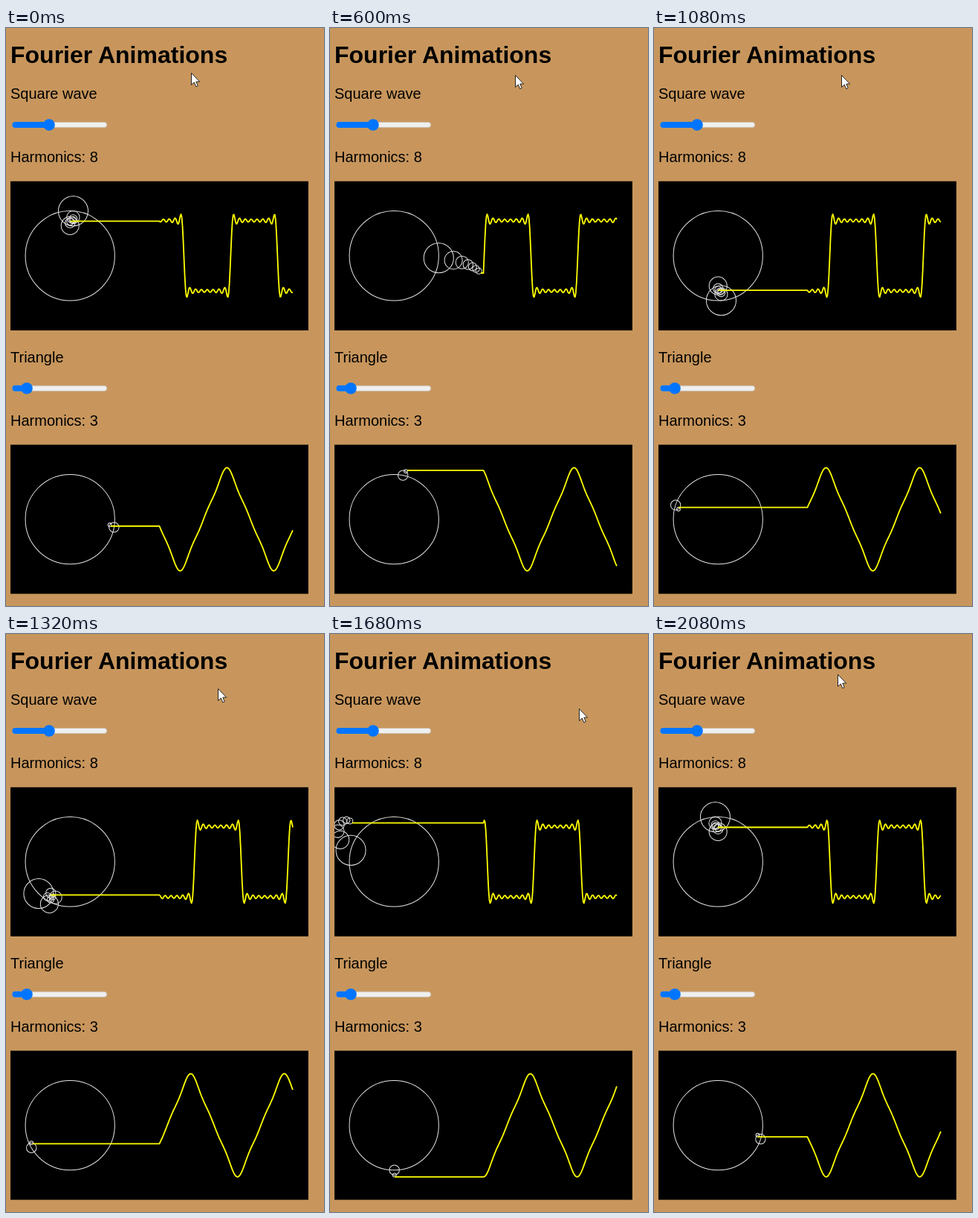
These frames come from a looping animation (428x776 px, 2120 ms). An HTML page:

```html
<!DOCTYPE html>
<html lang="en">
<head>
<meta charset="utf-8">
<title>Fourier Animations</title>
<style>
  html, body { margin: 0; width: 100%; height: 100%; overflow: hidden; background: #c8965c; }
  svg { display: block; }
  text { font: 20px Arial, "Liberation Sans", sans-serif; }
  .title { font-size: 32px; font-weight: bold; }
  .circle { fill: none; stroke: #e4e4e4; stroke-width: 1; }
  .wave { fill: none; stroke: #ff0; stroke-width: 1.8; stroke-linejoin: round; }
</style>
</head>
<body>
<svg id="stage" width="428" height="776" viewBox="0 0 428 776">
  <text class="title" x="6" y="47">Fourier Animations</text>
</svg>
<script>
const LOOP = 2120, TICK = 40, STEP = 0.05;
const RADIUS = 60, CENTER = { x: 80, y: 100 }, WAVE_X = 200, WAVE_LENGTH = 180;

// [ms, rotation steps taken]
const rotation = [[0, 0], [280, 10], [600, 31], [1080, 60], [1320, 77], [1680, 98], [2080, 123], [2120, 126]];
// [ms, x, y]
const pointer = [[0, 249, 60], [280, 247, 61], [600, 249, 63], [1080, 252, 63],
                 [1320, 285, 73], [1680, 335, 100], [2080, 247, 54], [2120, 249, 60]];

const stage = document.getElementById('stage');

function add(parent, tag, attrs, text) {
  const node = document.createElementNS('http://www.w3.org/2000/svg', tag);
  for (const key in attrs) node.setAttribute(key, attrs[key]);
  if (text) node.textContent = text;
  return parent.appendChild(node);
}

function sample(keys, time, column) {
  let i = 1;
  while (i < keys.length - 1 && keys[i][0] < time) i++;
  const a = keys[i - 1], b = keys[i];
  return a[column] + (b[column] - a[column]) * (time - a[0]) / (b[0] - a[0]);
}

function addSlider(y, thumbX) {
  add(stage, 'rect', { x: 8.8, y: y - 3.6, width: 127, height: 7.2, rx: 3.6, fill: '#efefef', stroke: '#c4b7a8', 'stroke-width': 0.8 });
  add(stage, 'rect', { x: 8.4, y: y - 4, width: thumbX - 8.4, height: 8, rx: 4, fill: '#0075ff' });
  add(stage, 'circle', { cx: thumbX, cy: y, r: 7.8, fill: '#0075ff' });
}

// amplitude(n) scales the n-th odd harmonic; direction is the sign of y on screen
function addPanel({ top, name, count, thumbX, phase, direction, amplitude }) {
  add(stage, 'text', { x: 6, y: top - 110.5 }, name);
  addSlider(top - 75.5, thumbX);
  add(stage, 'text', { x: 6, y: top - 25.5 }, 'Harmonics: ' + count);

  const view = add(stage, 'svg', { x: 6, y: top, width: 401, height: 200.5, viewBox: '0 0 400 200', overflow: 'hidden' });
  add(view, 'rect', { width: 400, height: 200, fill: '#000' });
  const harmonics = Array.from({ length: count }, (_, k) => {
    const n = 2 * k + 1, size = RADIUS * amplitude(n, k);
    return { n, size, ring: add(view, 'circle', { class: 'circle', r: Math.abs(size) }) };
  });
  const wave = add(view, 'path', { class: 'wave' });

  const height = angle => CENTER.y + direction *
    harmonics.reduce((sum, h) => sum + h.size * Math.sin(h.n * angle), 0);

  return steps => {
    const angle = phase + steps * STEP;
    let { x, y } = CENTER;
    for (const { n, size, ring } of harmonics) {
      ring.setAttribute('cx', x);
      ring.setAttribute('cy', y);
      x += size * Math.cos(n * angle);
      y += direction * size * Math.sin(n * angle);
    }
    let d = `M${x.toFixed(2)} ${y.toFixed(2)}`;
    for (let i = 0; i < WAVE_LENGTH; i++) {
      d += `L${WAVE_X + i} ${height(angle - i * STEP).toFixed(2)}`;
    }
    wave.setAttribute('d', d);
  };
}

const panels = [
  addPanel({ top: 205.5, name: 'Square wave', count: 8, thumbX: 58, phase: -1.5, direction: 1,
             amplitude: n => 1 / n }),
  addPanel({ top: 559.3, name: 'Triangle', count: 3, thumbX: 28, phase: -0.18, direction: -1,
             amplitude: (n, k) => (-1) ** k / (n * n) }),
];

const cursor = add(stage, 'path', {
  d: 'M0.5 0.5V16.5L4.3 13L6.8 18.8L9.2 17.7L6.8 12.1H11.6Z',
  fill: '#fff', stroke: '#222', 'stroke-width': 1, 'stroke-linejoin': 'round'
});

function render(now) {
  const time = Math.floor((now % LOOP) / TICK) * TICK;
  const steps = Math.round(sample(rotation, time, 1));
  panels.forEach(draw => draw(steps));
  cursor.setAttribute('transform', `translate(${sample(pointer, time, 1)} ${sample(pointer, time, 2)})`);
}

const start = performance.now();
function loop() {
  render(performance.now() - start);
  requestAnimationFrame(loop);
}
loop();
</script>
</body>
</html>
```
